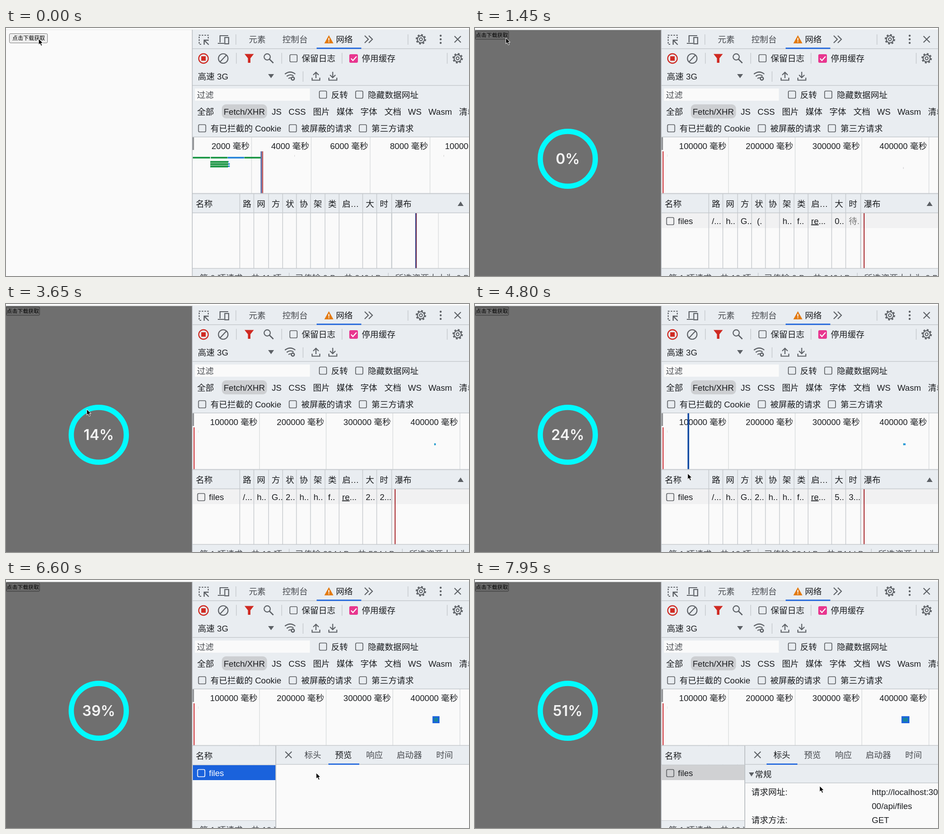
An HTML page for the animation above (8 s loop, 1021 by 549 pixels).

```html
<!DOCTYPE html>
<html lang="zh-CN">
<head>
<meta charset="utf-8">
<style>
html, body { margin: 0; width: 100%; height: 100%; overflow: hidden; background: #fafafa; }
svg { display: block; font-family: "Liberation Sans", "Noto Sans CJK SC", "Noto Sans CJK", sans-serif; }
text { white-space: pre; }
</style>
</head>
<body>
<svg width="1021" height="549" viewBox="0 0 1021 549"><g id="chrome"></g><g id="scene"></g><g id="pointer"></g></svg>
<script>
const LOOP = 8000, REQUEST = 1380, RESPONSE = 2040, OPEN = 5600, HEADERS = 7400;
const BAR = '#e9edf1', PAPER = '#fafafa', RULE = '#c6cace', ICON = '#5c6065', INK = '#1b1d20', DIM = '#484b50';
const BLUE = '#1a62dc', RED = '#cf2a22';

const rect = (x, y, w, h, fill, more = '') => `<rect x="${x}" y="${y}" width="${w}" height="${h}" fill="${fill}" ${more}/>`;
const text = (x, mid, s, fill = INK, size = 18.6, more = '') =>
  `<text x="${x}" y="${mid + size * .36}" font-size="${size}" fill="${fill}" ${more}>${s}</text>`;
const stroke = (d, color = ICON, w = 2.2, more = '') => `<path d="${d}" fill="none" stroke="${color}" stroke-width="${w}" ${more}/>`;
const shape = (d, fill = ICON) => `<path d="${d}" fill="${fill}"/>`;
const ring = (x, y, r, color = ICON, w = 2.2, more = '') =>
  `<circle cx="${x}" cy="${y}" r="${r}" fill="none" stroke="${color}" stroke-width="${w}" ${more}/>`;
const vline = (x, y1, y2, color = RULE, w = 1.5) => rect(x - w / 2, y1, w, y2 - y1, color);
const checkbox = (x, mid, color = '#5d6064') =>
  rect(x + 1, mid - 8, 16, 16, 'none', `rx="2.5" stroke="${color}" stroke-width="1.7"`);
const labels = (mid, list, color) => list.map(([x, s]) => text(x, mid, s, color)).join('');
const gear = (x, y) => ring(x, y, 7.8) + ring(x, y, 10, ICON, 3, 'stroke-dasharray="3.927"') + ring(x, y, 3.2, ICON, 2);
const cross = (x, y) => stroke(`M${x - 7} ${y - 7}l14 14m0-14l-14 14`);

function toolbars() {
  return rect(0, 0, 1021, 4, '#fefefe') + rect(0, 3.5, 1021, 1, '#dadddf') +
    rect(411, 4, 610, 545, BAR) +
    // tab strip
    stroke('M446 23v-7h-20v20h7', ICON, 2.2, 'stroke-dasharray="3.4 2.6"') +
    stroke('M447 37l-9-9m-1 9v-10h10', ICON, 2.4) +
    stroke('M472 32v-15h18M467 34h14') + rect(482.5, 21, 8.5, 14, 'none', `stroke="${ICON}" stroke-width="2.2"`) +
    vline(507, 14, 37) + labels(25.5, [[535.5, '元素'], [609.5, '控制台']], DIM) +
    shape('M712 16L722 34H702z', '#e37b12') + rect(711, 22, 2, 6, '#fff') + rect(711, 29.5, 2, 2, '#fff') +
    text(727.5, 25.5, '网络') + rect(411, 45, 610, 1.5, RULE) + rect(685, 43.5, 98.5, 2.8, BLUE) +
    stroke('M791 17l8 8-8 8m9-16l8 8-8 8') + vline(886.5, 14, 37) + gear(915, 25) +
    [17, 25, 33].map(y => `<circle cx="958.5" cy="${y}" r="2.2" fill="${ICON}"/>`).join('') + cross(996, 25) +
    // network actions
    ring(435.5, 67.5, 10.5, RED, 2.3) + rect(430.5, 62.5, 10, 10, RED) +
    ring(479, 67.5, 10.5) + stroke('M472 75l14-15') + vline(508, 55, 79) +
    shape('M526 57.5H546.5L539 67V77H533.5V67z', RED) + ring(576, 64, 6.8) + stroke('M581 69l8.5 8.5', ICON, 2.6) +
    vline(608, 55, 79) + checkbox(625, 67) + text(652, 67.5, '保留日志') + vline(741, 55, 79) +
    rect(757, 58, 19, 19, '#e8368f', 'rx="3"') + stroke('M761 67.5l4 4.5 8-9', '#fff', 2.2) +
    text(784.5, 67.5, '停用缓存') + vline(973, 55, 79) + gear(996, 67) +
    // throttling
    text(423, 107, '高速 3G') + shape('M578 102H591L584.5 111z') +
    stroke('M615 102q12-9 23 0M619 107q8-6 15-1M623 112q4-3 5-1') + ring(632.5, 112, 3.4, ICON, 2.6) +
    vline(655, 96, 119) + stroke('M675 110v5.5h17v-5.5M683.5 111v-13m-6 6l6-6 6 6') +
    stroke('M712 110v5.5h17.5v-5.5M720.5 97v13m-6-6l6 6 6-6') + rect(411, 126.5, 610, 1.5, RULE) +
    // filters
    rect(416.5, 134, 253.5, 27, PAPER) + text(421, 148.5, '过滤', DIM) +
    checkbox(690, 147.5) + text(717, 148, '反转') + checkbox(770, 147.5) + text(798, 148, '隐藏数据网址') +
    rect(476, 169, 99.5, 31, '#cdcfd2', 'rx="9"') +
    labels(185, [[421.5, '全部'], [480, 'Fetch/XHR'], [586, 'JS'], [623, 'CSS'], [677, '图片'], [729, '媒体'],
      [781.5, '字体'], [834.5, '文档'], [886.5, 'WS'], [931.5, 'Wasm'], [999, '清单']]) +
    checkbox(423.5, 222) + checkbox(623.5, 222) + checkbox(778, 222) +
    labels(222.5, [[451, '有已拦截的 Cookie'], [651, '被屏蔽的请求'], [806, '第三方请求']]);
}

function page(t, percent) {
  if (t < REQUEST) return rect(0, 4.5, 410, 545, PAPER) +
    rect(7.5, 12.5, 84, 20.5, '#efefef', 'rx="2.5" stroke="#767676"') + text(14, 23, '点击下载获取', '#000', 12);
  return rect(0, 4.5, 410, 545, '#6f6f6f') +
    rect(.5, 6.5, 73.5, 18.5, '#6a6a6a', 'rx="2" stroke="#333"') + text(1.5, 16, '点击下载获取', '#000', 11.9) +
    ring(204.6, 289.6, 60.7, '#00fbff', 11.6) +
    text(204.5, 289.7, percent + '%', '#f4f4f4', 32, 'text-anchor="middle" font-weight="600" font-family="Inter, sans-serif"');
}

function overview(t, mouse) {
  const loading = t >= REQUEST;
  const grid = loading ? [559, 706, 853, 1001] : [541.5, 673, 803, 935];
  let out = rect(411, 241, 610, 126, PAPER) + rect(411, 240.5, 610, 1.5, RULE) + rect(411, 242, 3.5, 28, '#8b8d90');
  grid.forEach((x, i) => {
    out += vline(x, 242, 366, '#dcdee0') +
      text(x - 4.5, 261.5, `${(i + 1) * (loading ? 100000 : 2000)} 毫秒`, INK, 18.6, 'text-anchor="end"');
  });
  if (!loading) {
    const green = '#12923e', blue = '#1f80d8';
    out += text(968, 261.5, '10000 毫秒') + rect(412, 285.3, 38, 3.5, green) + rect(451.5, 285.3, 37, 3.5, green) +
      rect(489, 285.3, 36, 3.5, blue) + rect(525.5, 285.3, 36, 3.5, green);
    for (const y of [294.5, 299.5, 304.5])
      out += rect(450.5, y, 39.5, 3.4, green) + rect(490, y, y < 297 ? 1 : 3.5, 3, blue) +
        stroke(`M451 ${y + 4}h39`, green, 1.5, 'stroke-dasharray="1.5 1.5"');
    return out + vline(562.8, 273, 366, '#20307f', 2) + vline(565.9, 273, 366, '#a52a32', 2) +
      rect(636, 281, 1, 4, '#d5d5d5') + rect(965, 281, 1, 4, '#d0d0d0');
  }
  const width = (t - REQUEST) * .00147;
  out += vline(414.7, 273, 366, '#c62128', 2) + rect(423.5, 280, 1, 5, '#ddd');
  if (t < RESPONSE) out += rect(944, 308, 1.3, 4, '#cfd1d3');
  else if (t < OPEN) out += rect(944.5, 308.5, width, 4, '#2491e0') + rect(944.5, 308.5, 1.5, 4, '#20a8b4');
  else out += rect(940.5, 301.5, 7.8 + width, 15.5, BLUE) + rect(944, 305, width + .8, 8.5, '#16859c');
  if (mouse.x > 411 && mouse.y > 242 && mouse.y < 378) out += vline(mouse.x + 1.5, 242, 366, '#0d47a1', 3.5);
  return out;
}

function table(t, percent) {
  const loading = t >= REQUEST, answered = t >= RESPONSE, size = percent * 21;
  const columns = [[515.5, '路', '/...'], [546.5, '网', 'h..'], [579, '方', 'G..'],
    [610, '状', answered ? '2..' : ' (.'], [640.5, '协', answered ? 'h..' : ''], [671.5, '架', 'h..'],
    [703.5, '类', 'f..'], [734.5, '启…', '<tspan text-decoration="underline">re</tspan>...'],
    [786.5, '大', String(size)[0] + '..'], [817.5, '时', answered ? Math.floor((t - REQUEST) / 1000) + '...' : '待.'],
    [850.5, '瀑布', '']];
  let out = rect(411, 366, 610, 43, BAR) + rect(411, 409, 610, 124, PAPER);
  if (loading) out += rect(411, 410, 610, 33, '#f1f1f2') + checkbox(421.5, 427.5) + text(447.5, 427, 'files');
  for (const [x, name, value] of columns) {
    out += vline(x, 367, 532) + text(x + 6.7, 389, name);
    if (loading) out += text(x + 6.7, 427, value, value == '待.' ? '#777' : INK);
  }
  out += text(418.5, 389, '名称') + shape('M996 394H1009L1002.5 384z') +
    rect(411, 365.5, 610, 2, RULE) + rect(411, 408.5, 610, 1.5, RULE) + vline(850.5, 410, 532, RULE, 2);
  out += loading ? vline(858, 410, 532, '#a52228', 2)
    : vline(953.5, 410, 532, '#dcdee0') + vline(905, 410, 532, '#a52a32', 1.6) + vline(903.6, 410, 532, '#20307f', 2);
  // summary bar
  const sep = size >= 1 ? 874 : 843;
  return out + rect(411, 533, 610, 16, BAR) + rect(411, 531.5, 610, 1.5, RULE) +
    vline(624.5, 542, 549) + vline(sep, 542, 549) +
    labels(553.5, [[427, loading ? '第 1 项请求，共 12 项' : '第 0 项请求，共 11 项'],
      [638, `已传输 ${size ? size + ' kB' : '0 B'}，共 ${240 + size} kB`],
      [sep + 15, `所选资源大小为 ${size ? size + ' kB' : '0 B'}`]], DIM);
}

function details(t) {
  if (t < OPEN) return '';
  const headers = t >= HEADERS, active = headers ? '标头' : '预览', ink = headers ? INK : '#fff';
  const field = (mid, name, value) => text(609.5, mid, name, INK, 18.6, 'font-weight="500"') + text(875, mid, value);
  let out = rect(412, 367.5, 183, 41, BAR) + text(418.5, 389, '名称') + rect(412, 410, 183, 122, PAPER) +
    rect(412, 410, 183, 33, headers ? '#d0d1d3' : BLUE) + checkbox(421.5, 427.5, headers ? '#5d6064' : '#fff') +
    text(447.5, 427, 'files', ink) +
    rect(595, 367, 426, 182, PAPER) + rect(596, 367, 425, 41, BAR) + rect(596, 407.5, 425, 1.5, RULE) +
    vline(595, 367, 549, '#bfc3c7', 2) + cross(623, 387);
  for (const [x, name] of [[658, '标头'], [725.5, '预览'], [794, '响应'], [861.5, '启动器'], [948.5, '时间']])
    out += text(x, 387.5, name, name == active ? INK : DIM);
  out += rect(headers ? 643 : 711, 406.3, 68, 2.7, BLUE);
  if (headers) out += rect(596, 409, 425, 40, BAR) + rect(596, 448.5, 425, 1.5, RULE) +
    shape('M604 426H615.5L609.7 435z') + text(617, 430, '常规') +
    field(469, '请求网址:', 'http://localhost:30') + text(875, 500, '00/api/files') + field(531, '请求方法:', 'GET');
  return out;
}

// time, x, y of the arrow tip
const route = [[0, 72, 24], [400, 72, 24], [900, 68, 22], [2100, 68, 22], [2800, 174, 225], [3600, 178, 233],
  [3850, 178, 233], [4500, 473, 325], [5100, 465, 425], [5650, 465, 425], [6400, 684, 427], [6850, 684, 427],
  [7250, 676, 386], [7450, 676, 386], [7850, 760, 456], [8000, 760, 456]];

function mouseAt(t) {
  const i = route.findIndex(p => p[0] > t), [t0, x0, y0] = route[i - 1], [t1, x1, y1] = route[i];
  const k = (t - t0) / (t1 - t0), e = k * k * (3 - 2 * k);
  return { x: x0 + (x1 - x0) * e, y: y0 + (y1 - y0) * e };
}

const byId = id => document.getElementById(id);
byId('chrome').innerHTML = toolbars();
byId('pointer').innerHTML = '<path d="M0 0V13L3 10.3 5.3 15.5 7.7 14.5 5.5 9.4H9.5z" fill="#000" stroke="#fff" stroke-linejoin="round"/>';

let drawn = '';
function render(now) {
  const t = now % LOOP, mouse = mouseAt(t);
  const percent = Math.max(0, Math.floor((t - RESPONSE) * .0087));
  const picture = page(t, percent) + overview(t, mouse) + table(t, percent) + details(t) + vline(410.7, 4, 549, '#b9bdc2');
  if (picture != drawn) byId('scene').innerHTML = drawn = picture;
  byId('pointer').setAttribute('transform', `translate(${mouse.x} ${mouse.y})`);
}

const start = performance.now();
(function tick() {
  render(performance.now() - start);
  requestAnimationFrame(tick);
})();
</script>
</body>
</html>
```
